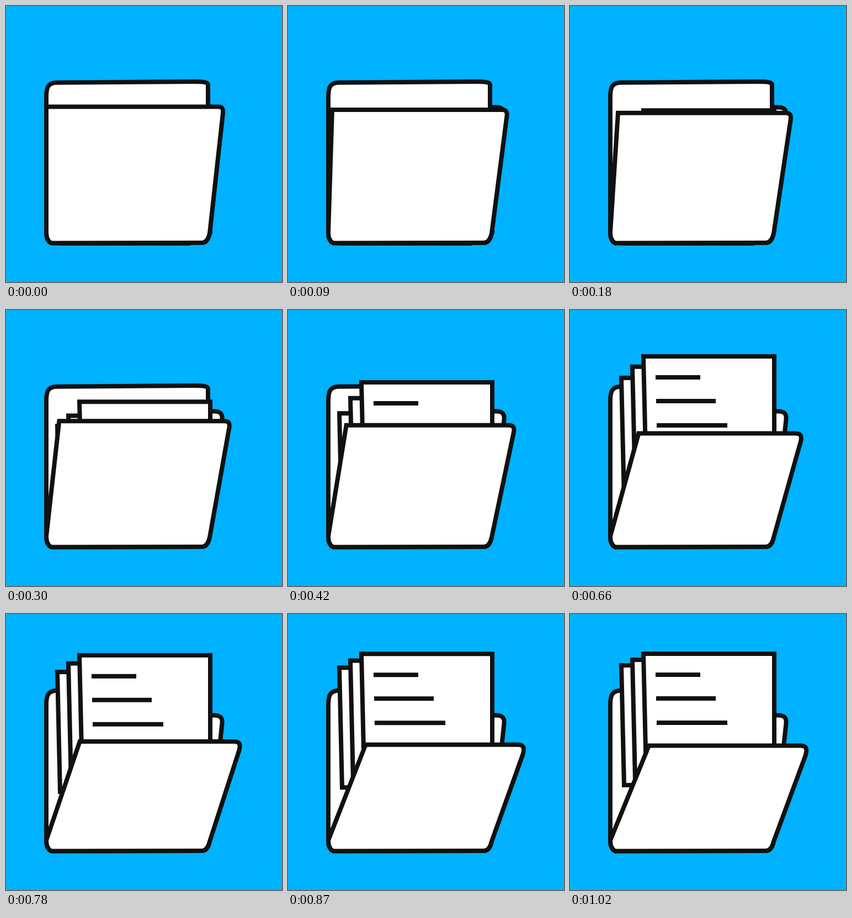
Animation, 500 px wide and 500 px high, one loop 1800 ms. Source, as an HTML page:

```html
<!DOCTYPE html>
<html lang="en">
<head>
<meta charset="utf-8">
<title>Opening folder</title>
<style>
  html, body { margin: 0; width: 100%; height: 100%; overflow: hidden; background: #00b2ff; }
  svg { display: block; width: 100%; height: 100%; }
  path { fill: #fff; stroke: #111; stroke-width: 8; stroke-miterlimit: 6; }
</style>
</head>
<body>
<svg viewBox="0 0 500 500">
  <defs><path id="sheet" d="M0 0H237V217H5Z"/></defs>
  <path d="M73 410V165C73 146 77 139 92 138.700L340 137C358 137 366 138 366 143V183.500H377C388 183.500 392.500 188 391.500 198L369 410Q366 429 355 429L82 429.500Q73 425 73 410Z"/>
  <g class="paper"><use href="#sheet"/></g>
  <g class="paper"><use href="#sheet"/></g>
  <g class="paper">
    <use href="#sheet"/>
    <path d="M22 38h81M23 81h108M24 125h128"/>
  </g>
  <path id="cover"/>
</svg>
<script>
const LOOP = 1800, STEP = 30;
const OPEN_TIME = 900, RISE_TIME = 780, RISE = 120;
const cover = document.getElementById('cover');
const papers = [...document.querySelectorAll('.paper')];
// Resting place and start time of each sheet, back to front.
const sheets = [
  { x: 93, y: 93, start: 240 },
  { x: 113, y: 83, start: 180 },
  { x: 133, y: 72, start: 120 },
];

const clamp = v => Math.max(0, Math.min(1, v));

// Cubic bezier easing (0.3, 0, 0.38, 1), solved by bisection.
function ease(x) {
  if (x <= 0 || x >= 1) return clamp(x);
  let lo = 0, hi = 1;
  for (let i = 0; i < 24; i++) {
    const u = (lo + hi) / 2, v = 1 - u;
    if (0.9 * v * v * u + 1.14 * v * u * u + u ** 3 < x) lo = u;
    else hi = u;
  }
  return lo * lo * (3 - 2 * lo);
}

function coverPath(p) {
  const pt = (x0, y0, x1, y1) => `${x0 + (x1 - x0) * p} ${y0 + (y1 - y0) * p} `;
  return 'M' + pt(73, 182.5, 143, 238.5) +
    'L' + pt(385, 182.5, 417, 238.5) +
    'C' + pt(391, 182.5, 429, 238.5) + pt(394, 186, 430.5, 245) + pt(393, 194, 426, 258) +
    'L369 412Q365 429 355 429L82 429.5Q73 425 73 410Z';
}

function draw(now) {
  const t = Math.floor(now % LOOP / STEP) * STEP;
  cover.setAttribute('d', coverPath(clamp(t / OPEN_TIME)));
  sheets.forEach(({ x, y, start }, i) => {
    const drop = RISE * (1 - ease((t - start) / RISE_TIME));
    papers[i].setAttribute('transform', `translate(${x} ${y + drop})`);
  });
}

function tick() {
  draw(performance.now());
  requestAnimationFrame(tick);
}
tick();
</script>
</body>
</html>
```
